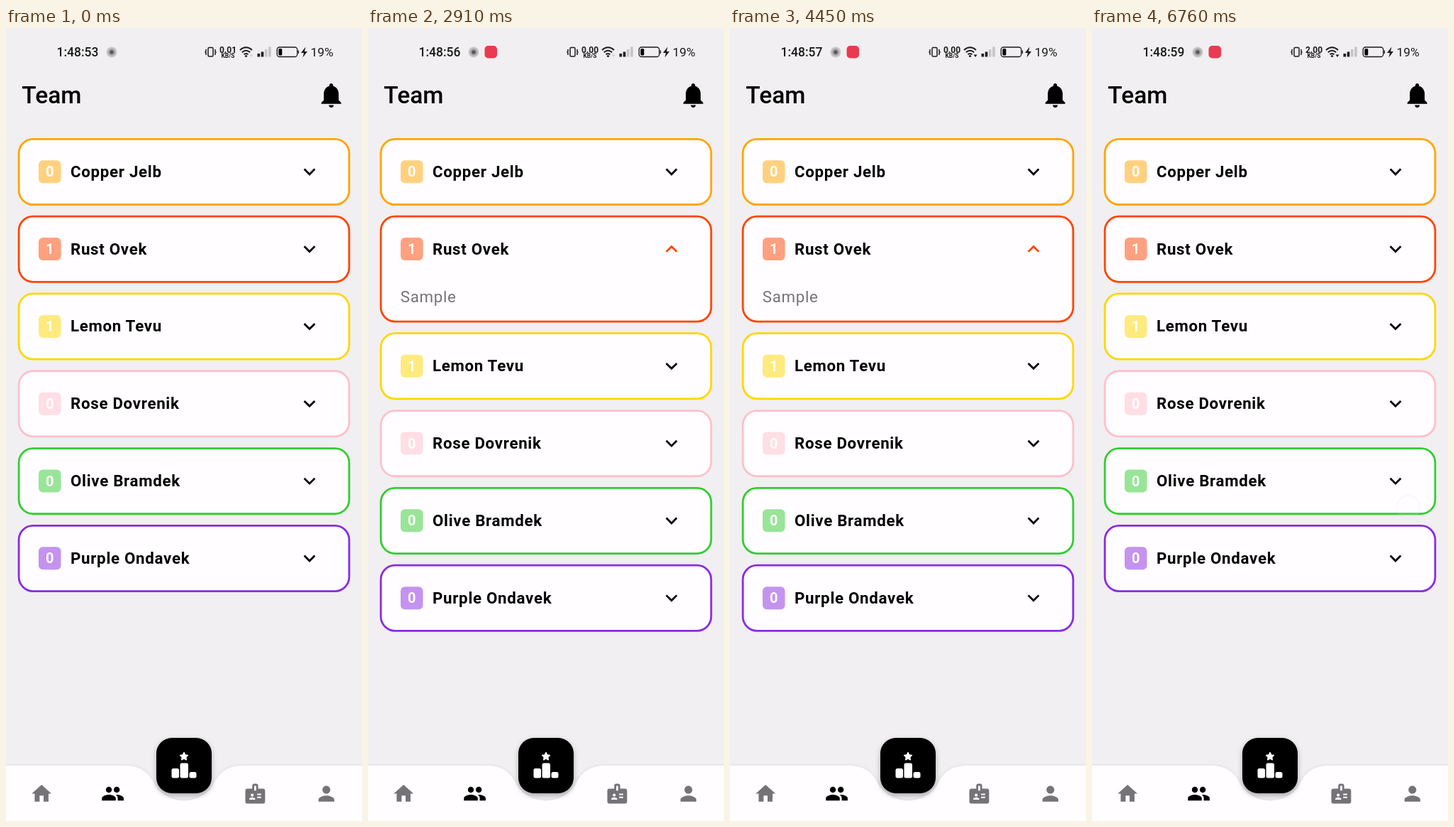
An HTML page that plays this animation: 502 by 1116 pixels, repeating every 6.79 s.

```html
<!DOCTYPE html>
<html lang="en">
<head>
<meta charset="utf-8">
<title>Team</title>
<style>
  html, body { margin: 0; width: 100%; height: 100%; overflow: hidden; background: #f1eff1; }
  svg { display: block; font-family: Roboto, sans-serif; }
  .stage { width: 502px; height: 1116px; }
  .name { font-size: 22.3px; font-weight: 600; letter-spacing: .7px; }
  .item { font-size: 22.3px; letter-spacing: .7px; fill: #757378; }
  .count { font-size: 20px; font-weight: 600; fill: #fff; text-anchor: middle; }
  .title { font-size: 33.5px; font-weight: 500; }
  .clock { font-size: 17.5px; font-weight: 500; fill: #1b1b1b; }
  .speed { font-weight: 700; fill: #1b1b1b; text-anchor: middle; }
</style>
</head>
<body>
<svg class="stage" viewBox="0 0 502 1116">
  <defs>
    <radialGradient id="halo">
      <stop offset=".2" stop-color="#555"/>
      <stop offset=".5" stop-color="#aaa"/>
      <stop offset=".9" stop-color="#d2d0d2"/>
      <stop offset="1" stop-color="#d2d0d2" stop-opacity="0"/>
    </radialGradient>
    <filter id="shadow" x="-30%" y="-30%" width="160%" height="160%">
      <feDropShadow dx="0" dy="3" stdDeviation="3.5" flood-opacity=".3"/>
    </filter>
    <filter id="barShadow" x="-5%" y="-20%" width="110%" height="140%">
      <feDropShadow dx="0" dy="0" stdDeviation="2" flood-opacity=".1"/>
    </filter>
  </defs>
  <rect width="502" height="1116" fill="#f1eff1"/>

  <!-- status bar -->
  <text class="clock" id="clock" x="71.5" y="40"></text>
  <circle cx="149" cy="34" r="8" fill="url(#halo)"/>
  <rect id="recorder" x="164.5" y="25" width="17.5" height="17.5" rx="5" fill="#ea3a50"/>
  <g fill="none" stroke="#1b1b1b" stroke-width="1.5">
    <rect x="285" y="27.5" width="7" height="12.5" rx="1.5"/>
    <path d="M282 30v3l-1 1 1 1v3M295 30v3l1 1-1 1v3"/>
  </g>
  <text class="speed" id="speed" x="313" y="34.5" font-size="12"></text>
  <text class="speed" x="313" y="42.3" font-size="8.4">KB/S</text>
  <g fill="none" stroke="#1b1b1b" stroke-width="2">
    <path d="M330 31Q338.5 23.5 347 31M332.8 34.3Q338.5 29.3 344.2 34.3M335.5 37.3Q338.5 34.8 341.5 37.3"/>
  </g>
  <circle cx="338.5" cy="39.5" r="1.6" fill="#1b1b1b"/>
  <path id="traffic" d="M343.5 37.5h5l-2.5 3.5z"/>
  <path d="M354.5 36h3.6v4.5h-3.6zM359.7 33.5h3.6v7h-3.6z" fill="#1b1b1b"/>
  <path d="M364.9 30h3.6v10.5h-3.6zM370.1 26.5h3.6v14h-3.6z" fill="#c6c4c6"/>
  <rect x="382.2" y="27" width="28.5" height="13.5" rx="3.5" fill="none" stroke="#1b1b1b" stroke-width="1.3"/>
  <path d="M412.3 31.5v4.5" stroke="#1b1b1b" stroke-width="1.5"/>
  <rect x="384.3" y="29" width="5" height="9.5" rx="1.5"/>
  <path d="M422.5 26.5l-6.5 8.5h4l-1.5 6.5 6.5-8.5h-4z" fill="#1b1b1b"/>
  <text x="429.5" y="40" font-size="17.3" fill="#1b1b1b">19%</text>

  <!-- header -->
  <text class="title" x="22.3" y="105.8">Team</text>
  <path transform="translate(437.7 73.6) scale(1.743)" d="M12 22c1.1 0 2-.9 2-2h-4c0 1.1.89 2 2 2zm6-6v-5c0-3.07-1.64-5.64-4.5-6.32V4c0-.83-.67-1.5-1.5-1.5s-1.5.67-1.5 1.5v.68C7.63 5.36 6 7.92 6 11v5l-2 2v1h16v-1l-2-2z"/>

  <g id="cards"></g>

  <!-- bottom bar -->
  <path filter="url(#barShadow)" fill="#fffdff" d="M-10 1038H165C190 1038 201 1047 210 1066A50 50 0 0 0 292 1066C301 1047 312 1038 337 1038H512V1130H-10Z"/>
  <rect x="212" y="999" width="78" height="78" rx="22" filter="url(#shadow)"/>
  <g fill="#fff">
    <path id="star" stroke="#fff" stroke-width="1.5" stroke-linejoin="round"/>
    <rect x="233.5" y="1042" width="10.5" height="13.5" rx="2.5"/>
    <rect x="245.5" y="1034.5" width="11.5" height="21" rx="2.5"/>
    <rect x="258.5" y="1047" width="10" height="8.5" rx="2.5"/>
  </g>
  <g id="nav"></g>
  <circle id="touch" r="16" fill="#fff" fill-opacity=".5" stroke="#dcdde6" stroke-width="2.2"/>
</svg>
<script>
const LOOP = 6790, FIRST_TOP = 154.9, CARD_H = 95, PITCH = 108.81, BODY_H = 55.8;
const TOGGLE_MS = 200, FADE_MS = 180;

const teams = [
  { name: 'Copper Jelb', count: 0, rgb: [255, 165, 0] },
  { name: 'Rust Ovek', count: 1, rgb: [255, 69, 0], item: 'Sample', open: 2402, close: 5099 },
  { name: 'Lemon Tevu', count: 1, rgb: [255, 215, 0], item: 'Test', open: 3200, close: 4219 },
  { name: 'Rose Dovrenik', count: 0, rgb: [255, 192, 203] },
  { name: 'Olive Bramdek', count: 0, rgb: [50, 205, 50] },
  { name: 'Purple Ondavek', count: 0, rgb: [138, 43, 226] }
];

const touches = [
  { x: 437, y: 323, down: 2330, up: 2402 },
  { x: 427.5, y: 473, down: 3090, up: 3200 },
  { x: 427.5, y: 473, down: 4090, up: 4219 },
  { x: 445, y: 294, down: 5030, up: 5099 },
  { x: 446, y: 674, down: 6570, up: 6610 }
];

const icons = [
  [50.2, '#757378', 'M10 20v-6h4v6h5v-8h3L12 3 2 12h3v8z'],
  [150.6, '#000', 'M16 11c1.66 0 2.99-1.34 2.99-3S17.66 5 16 5s-3 1.34-3 3 1.34 3 3 3zm-8 0c1.66 0 2.99-1.34 2.99-3S9.66 5 8 5 5 6.34 5 8s1.34 3 3 3zm0 2c-2.33 0-7 1.17-7 3.5V19h14v-2.5c0-2.33-4.67-3.5-7-3.5zm8 0c-.29 0-.62.02-.97.05 1.16.84 1.97 1.97 1.97 3.45V19h6v-2.5c0-2.33-4.67-3.5-7-3.5z'],
  [351.4, '#757378', 'M20 7h-5V4c0-1.1-.9-2-2-2h-2c-1.1 0-2 .9-2 2v3H4c-1.1 0-2 .9-2 2v11c0 1.1.9 2 2 2h16c1.1 0 2-.9 2-2V9c0-1.1-.9-2-2-2zM9 12c.83 0 1.5.67 1.5 1.5S9.83 15 9 15s-1.5-.67-1.5-1.5S8.17 12 9 12zm3 6H6v-.75c0-1 2-1.5 3-1.5s3 .5 3 1.5V18zm1-9h-2V4h2v5zm5 7.5h-4V15h4v1.5zm0-3h-4V12h4v1.5z'],
  [451.8, '#757378', 'M12 12c2.21 0 4-1.79 4-4s-1.79-4-4-4-4 1.79-4 4 1.79 4 4 4zm0 2c-2.67 0-8 1.34-8 4v2h16v-2c0-2.66-5.33-4-8-4z']
];

const $ = id => document.getElementById(id);
const clamp = v => Math.min(1, Math.max(0, v));
const set = (el, attrs) => { for (const k in attrs) el.setAttribute(k, attrs[k]); };

// cubic-bezier(.42, 0, 1, 1)
function easeIn(x) {
  let lo = 0, hi = 1;
  for (let i = 0; i < 20; i++) {
    const s = (lo + hi) / 2, r = 1 - s;
    if (1.26 * s * r * r + 3 * s * s * r + s ** 3 < x) lo = s; else hi = s;
  }
  return 3 * lo * lo * (1 - lo) + lo ** 3;
}

function openness({ open, close }, t) {
  if (!open || t <= open) return 0;
  const phase = t < close ? (t - open) / TOGGLE_MS : 1 - (t - close) / TOGGLE_MS;
  return easeIn(clamp(phase));
}

$('cards').innerHTML = teams.map(({ name, count, rgb, item }) => `
  <g>
    <rect class="box" x="18.1" y="1.4" width="465.8" rx="20" fill="#fffdff" stroke="rgb(${rgb})" stroke-width="2.8"/>
    <rect x="46" y="31.4" width="31.5" height="32" rx="6" fill="rgb(${rgb})" fill-opacity=".5"/>
    <text class="count" x="61.8" y="54.5">${count}</text>
    <text class="name" x="91" y="54.8">${name}</text>
    <path class="chevron" d="M4.59-3.41L0 1.17-4.59-3.41-6-2l6 6 6-6z"/>
    <svg class="body" y="86.4" width="502" overflow="hidden"><text class="item" x="45.7">${item || ''}</text></svg>
  </g>`).join('');

const cards = [...$('cards').children].map((group, i) => ({
  group, team: teams[i],
  box: group.querySelector('.box'),
  chevron: group.querySelector('.chevron'),
  body: group.querySelector('.body'),
  item: group.querySelector('.item')
}));

$('nav').innerHTML = icons.map(([x, color, d]) =>
  `<path transform="translate(${x - 16.73} 1060.8) scale(1.394)" fill="${color}" fill-rule="evenodd" d="${d}"/>`).join('');

$('star').setAttribute('d', 'M' + Array.from({ length: 10 }, (_, i) => {
  const r = i % 2 ? 2.8 : 5.6, a = i * Math.PI / 5;
  return `${251 + r * Math.sin(a)} ${1025.3 - r * Math.cos(a)}`;
}).join('L') + 'Z');

function drawCards(t) {
  let top = FIRST_TOP;
  for (const { group, team, box, chevron, body, item } of cards) {
    const p = openness(team, t), h = p * BODY_H;
    set(group, { transform: `translate(0 ${top})` });
    set(box, { height: CARD_H - 2.8 + h });
    set(chevron, {
      transform: `translate(428 47.4) rotate(${180 * p}) scale(1.394)`,
      fill: `rgb(${team.rgb.map(c => Math.round(c * p))})`
    });
    set(body, { height: h });
    set(item, { y: h / 2 + 7.6 });
    top += PITCH + h;
  }
}

function drawTouch(t) {
  const hit = touches.find(({ down, up }) => t >= down && t < up + FADE_MS);
  const alpha = hit ? Math.min(clamp((t - hit.down) / 30), 1 - clamp((t - hit.up) / FADE_MS)) : 0;
  set($('touch'), { opacity: alpha, cx: hit ? hit.x : 0, cy: hit ? hit.y : 0 });
}

function drawStatus(t) {
  $('clock').textContent = '1:48:' + (53 + Math.floor((t + 150) / 1000));
  $('speed').textContent = t < 2340 ? '0.01' : t < 6600 ? '0.00' : '2.00';
  set($('traffic'), { fill: t < 3820 ? '#d0ced0' : '#1b1b1b' });
  const s = clamp((t - 610) / 250);
  set($('recorder'), { opacity: s, transform: `translate(173.2 33.8) scale(${s}) translate(-173.2 -33.8)` });
}

const start = performance.now();
function frame() {
  const t = (performance.now() - start) % LOOP;
  drawCards(t);
  drawTouch(t);
  drawStatus(t);
  requestAnimationFrame(frame);
}
frame();
</script>
</body>
</html>
```
